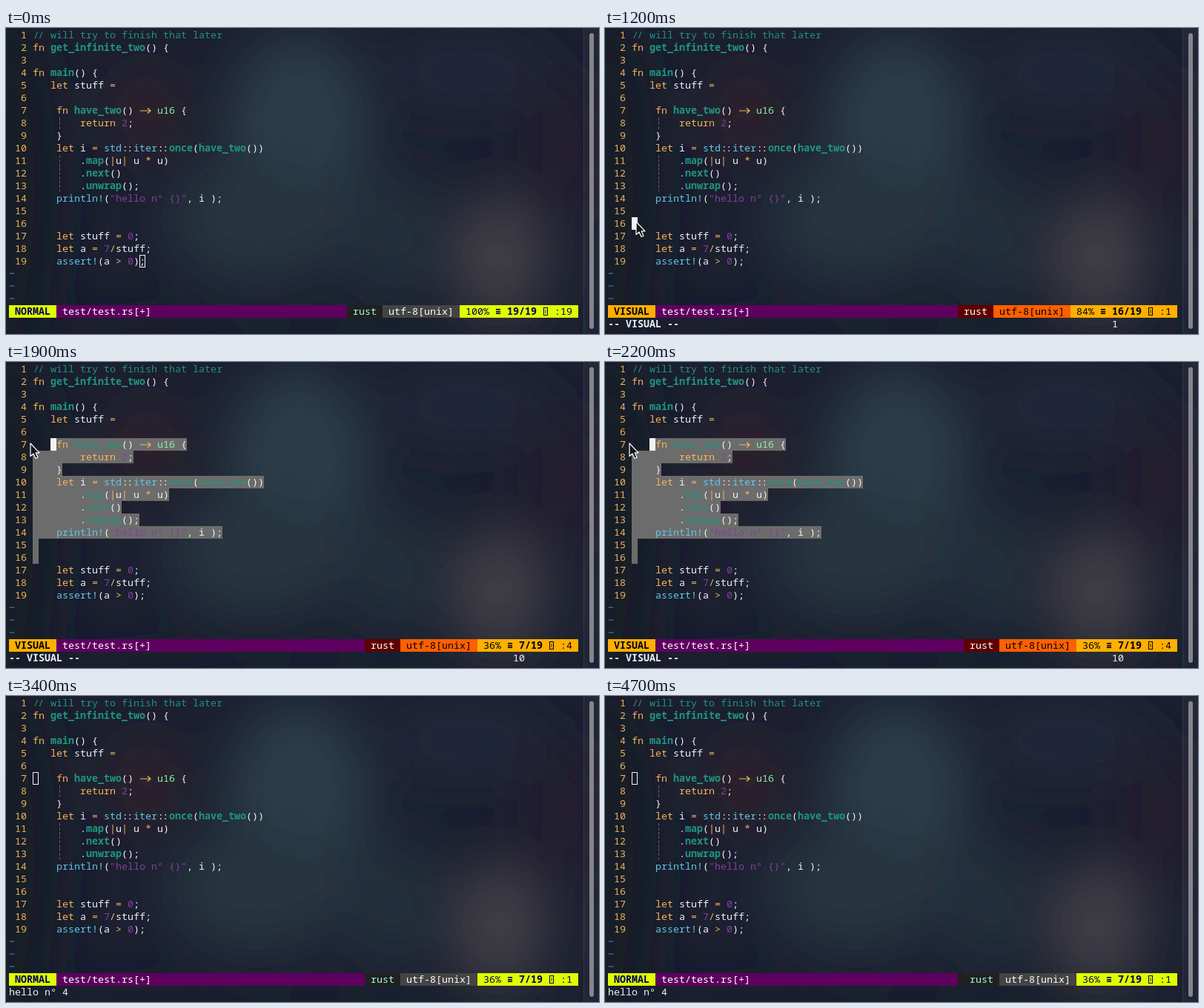
Recreate the animation shown at these times as an HTML page. Size 800 by 414 pixels, loop 4800 ms.

```html
<!DOCTYPE html>
<html lang="en">
<head>
<meta charset="utf-8">
<title>Editor session</title>
<style>
html, body { margin: 0; width: 100%; height: 100%; overflow: hidden; background: #1c2030; }
svg { display: block; width: 100vw; height: 100vh; }
text {
  font: 13.333px "Noto Sans Mono", "DejaVu Sans Mono", monospace;
  font-variant-ligatures: none;
  white-space: pre;
}
.bold { font-weight: 700; }
.visual .selected { font-weight: 400; }
</style>
</head>
<body>
<svg id="stage" viewBox="0 0 800 414" preserveAspectRatio="none">
  <defs>
    <filter id="blur" x="-100%" y="-100%" width="300%" height="300%">
      <feGaussianBlur stdDeviation="34"/>
    </filter>
  </defs>
  <rect width="800" height="414" fill="#1c2030"/>
  <g filter="url(#blur)">
    <ellipse cx="0" cy="220" rx="70" ry="240" fill="#171a28"/>
    <ellipse cx="395" cy="130" rx="95" ry="120" fill="#2b3c48"/>
    <ellipse cx="340" cy="260" rx="120" ry="85" fill="#25343f"/>
    <ellipse cx="520" cy="280" rx="70" ry="90" fill="#232d3a"/>
    <ellipse cx="190" cy="115" rx="42" ry="55" fill="#33232c"/>
    <ellipse cx="665" cy="310" rx="65" ry="85" fill="#403c45"/>
    <ellipse cx="750" cy="160" rx="60" ry="90" fill="#221f2d"/>
    <ellipse cx="620" cy="60" rx="110" ry="50" fill="#20263a"/>
    <ellipse cx="400" cy="420" rx="420" ry="22" fill="#191c29"/>
  </g>
  <rect x="779" width="21" height="414" fill="#fff" opacity=".035"/>
  <rect x="779" width="1" height="414" fill="#fff" opacity=".08"/>
  <rect x="787" y="7" width="6" height="400" rx="3" fill="#85858b"/>
  <g id="selection" fill="#6c6c6c"></g>
  <g id="guides" stroke="#5a6066" stroke-dasharray="4 2"></g>
  <g id="code"></g>
  <g id="status"></g>
  <g id="cursor"></g>
  <path id="mouse" d="M0 0V17.5L4 14L7 20.5L10 19.2L7.2 12.8H12Z" fill="#15151a" stroke="#fff" stroke-width="1.2" stroke-linejoin="round"/>
</svg>
<script>
const CELL = 8, LINE = 17, LEFT = 4, GUTTER = 4, LAST_SELECTED = 16, LOOP = 4800;
const source = `// will try to finish that later
fn get_infinite_two() {

fn main() {
   let stuff =

    fn have_two() -> u16 {
        return 2;
    }
    let i = std::iter::once(have_two())
        .map(|u| u * u)
        .next()
        .unwrap();
    println!("hello n° {}", i );


    let stuff = 0;
    let a = 7/stuff;
    assert!(a > 0);`.split('\n');

const rules = [
  ['comment', /\/\/|(?<=\/\/.*)\S.*/, '#22917f'],
  ['string', /"[^"]*"/, '#82409c'],
  ['keyword', /\b(?:fn|let|return)\b/, '#f3b55b'],
  ['type', /\bu16\b/, '#87efac'],
  ['macro', /\w+!|\w+(?=::)/, '#62c5e4'],
  ['call', /\w+(?=\()/, '#20957f'],
  ['number', /\b\d+/, '#82409c'],
  ['arrow', /->/, '#f3b55b'],
  ['operator', /[=>*|\/]/, '#f3b55b'],
  ['plain', /::|\w+|[^\s\w]/, '#f1f1f4']
];
const lexer = new RegExp(rules.map(([name, re]) => `(?<${name}>${re.source})`).join('|'), 'g');
const colors = Object.fromEntries(rules.map(([name, , color]) => [name, color]));

const $ = id => document.getElementById(id);
const colX = col => LEFT + col * CELL;
const rowY = row => 1 + (row - 1) * LINE;

function add(parent, tag, attrs, content) {
  const node = document.createElementNS('http://www.w3.org/2000/svg', tag);
  for (const key in attrs) node.setAttribute(key, attrs[key]);
  if (content !== undefined) node.textContent = content;
  parent.append(node);
  return node;
}
const write = (parent, col, row, content, fill, extra) =>
  add(parent, 'text', { x: colX(col), y: rowY(row) + 13, fill, ...extra }, content);
const block = (parent, col, row, width, attrs) =>
  add(parent, 'rect', { x: colX(col), y: rowY(row), width: width * CELL, height: LINE, ...attrs });

function drawToken(kind, content, col, row) {
  const x = colX(col), y = rowY(row) + 9;
  if (kind === 'arrow') {
    add($('code'), 'path', {
      d: `M${x + 1} ${y}h14m-4 -3.5l4 3.5l-4 3.5`, fill: 'none', stroke: colors.arrow, 'stroke-width': 1.2
    });
    return;
  }
  const tight = content === '::' || content === '//';
  const classes = kind === 'call' ? 'bold' + (row >= 7 && row <= LAST_SELECTED ? ' call' : '') : '';
  const node = write($('code'), col, row, content, colors[kind], { class: classes, 'data-row': row });
  if (tight) {
    node.setAttribute('x', x + 0.8);
    node.style.letterSpacing = '-1.6px';
  }
}

source.forEach((line, i) => {
  const row = i + 1;
  write($('code'), 0, row, String(row).padStart(3), '#efb25a');
  for (const match of line.matchAll(lexer)) {
    const kind = Object.keys(match.groups).find(name => match.groups[name] !== undefined);
    drawToken(kind, match[0], GUTTER + match.index, row);
  }
});
for (const row of [20, 21, 22]) write($('code'), 0, row, '~', '#4b9fd0');
const guides = [8, 11, 12, 13].map(row => {
  const x = colX(GUTTER + 4) + 4.5, y = rowY(row) + 1;
  return { row, node: add($('guides'), 'path', { d: `M${x} ${y}v16` }) };
});
const calls = [...document.querySelectorAll('.call')];

const themes = {
  NORMAL: { main: '#dfff00', ink: '#00005f', type: '#202020', typeInk: '#9cffd3', enc: '#444444', encInk: '#ffffff' },
  VISUAL: { main: '#ffaf00', ink: '#000000', type: '#5f0000', typeInk: '#ffffff', enc: '#ff5f00', encInk: '#000000' }
};

// Editor states: start time, mode, cursor row and column
const states = [
  [0, 'NORMAL', 19, 18],
  [1100, 'NORMAL', 16, 0],
  [1200, 'VISUAL', 16, 0],
  [1300, 'VISUAL', 13, 10],
  [1400, 'VISUAL', 10, 11],
  [1500, 'VISUAL', 9, 4],
  [1600, 'VISUAL', 8, 6],
  [1700, 'VISUAL', 7, 5],
  [1800, 'VISUAL', 7, 3],
  [2500, 'NORMAL', 7, 0]
];
// Pointer path: time, x, y
const pointer = [
  [400, 590, 330], [700, 394, 232], [1100, 42, 262], [1200, 42, 262],
  [1400, 115, 162], [1700, 64, 112], [1900, 33, 110], [2500, 33, 110]
];

function drawStatus(mode, row, col, gap) {
  const theme = themes[mode], g = $('status');
  g.replaceChildren();
  const percent = Math.floor(row / source.length * 100) + '%';
  const place = `≡ ${row}/${source.length}`, column = ':' + (col + 1);
  const end = 96, start = end - percent.length - place.length - column.length - 6;
  const enc = start - 13, type = enc - 6;
  block(g, 0, 23, 8, { fill: theme.main });
  block(g, 8, 23, type - 8 - gap, { fill: '#5f005f' });
  block(g, type - gap, 23, 6 + gap, { fill: theme.type });
  block(g, enc, 23, 13, { fill: theme.enc });
  block(g, start, 23, end - start, { fill: theme.main });
  write(g, 1, 23, mode, theme.ink, { class: 'bold' });
  write(g, 9, 23, 'test/test.rs[+]', '#fff');
  write(g, type + 1, 23, 'rust', theme.typeInk);
  write(g, enc + 1, 23, 'utf-8[unix]', theme.encInk);
  let c = start + 1;
  write(g, c, 23, percent, theme.ink);
  c += percent.length + 1;
  write(g, c, 23, place, theme.ink, { class: 'bold' });
  c += place.length + 1;
  add(g, 'rect', { x: colX(c) + 1.5, y: rowY(23) + 3.5, width: 5, height: 10, fill: 'none', stroke: theme.ink });
  add(g, 'path', { d: `M${colX(c) + 4} ${rowY(23) + 6}v5`, stroke: theme.ink, 'stroke-width': .8 });
  write(g, c + 2, 23, column, theme.ink);
}

function drawSelection(visual, row, col) {
  $('selection').replaceChildren();
  const covered = r => visual && r >= row && r <= LAST_SELECTED;
  for (let r = row; covered(r); r++) {
    const from = r === row ? col : 0;
    const to = r === LAST_SELECTED ? 1 : Math.max(1, source[r - 1].length);
    block($('selection'), GUTTER + from, r, Math.max(1, to - from));
  }
  $('stage').classList.toggle('visual', visual);
  for (const node of calls) node.classList.toggle('selected', covered(+node.dataset.row));
  for (const { row: r, node } of guides) node.style.display = covered(r) ? 'none' : '';
}

function drawCursor(row, col, focused) {
  const g = $('cursor'), x = colX(GUTTER + col), y = rowY(row);
  g.replaceChildren();
  if (!focused) {
    add(g, 'rect', { x: x + .5, y: y + .5, width: 7, height: 16, fill: 'none', stroke: '#f7f1f5' });
    return;
  }
  block(g, GUTTER + col, row, 1, { fill: '#f7f1f5' });
  write(g, GUTTER + col, row, source[row - 1][col] || ' ', '#1c2030');
}

function drawMessage(t, visual, row) {
  const g = $('status');
  if (visual) {
    write(g, 0, 24, '-- VISUAL --', '#f1f1f4', { class: 'bold' });
    write(g, 85, 24, LAST_SELECTED - row + 1, '#f1f1f4');
  } else if (t >= 2500) {
    write(g, 0, 24, 'hello n° 4', '#f1f1f4');
  }
}

function drawMouse(t) {
  const shown = t >= pointer[0][0] && t < pointer.at(-1)[0];
  $('mouse').style.display = shown ? '' : 'none';
  if (!shown) return;
  const i = pointer.findIndex(p => p[0] > t);
  const [t0, x0, y0] = pointer[i - 1], [t1, x1, y1] = pointer[i];
  const k = (t - t0) / (t1 - t0);
  $('mouse').setAttribute('transform', `translate(${x0 + (x1 - x0) * k} ${y0 + (y1 - y0) * k})`);
}

function render(t) {
  const [, mode, row, col] = states.findLast(s => s[0] <= t);
  const visual = mode === 'VISUAL';
  drawSelection(visual, row, col);
  drawStatus(mode, row, col, t >= 4300 ? 1 : 0);
  drawMessage(t, visual, row);
  drawCursor(row, col, t >= 400 && t < 3200);
  drawMouse(t);
}

const begin = performance.now();
let shownTick = -1;
function frame() {
  const tick = Math.floor(((performance.now() - begin) % LOOP) / 100) * 100;
  if (tick !== shownTick) render(shownTick = tick);
  requestAnimationFrame(frame);
}
frame();
</script>
</body>
</html>
```
